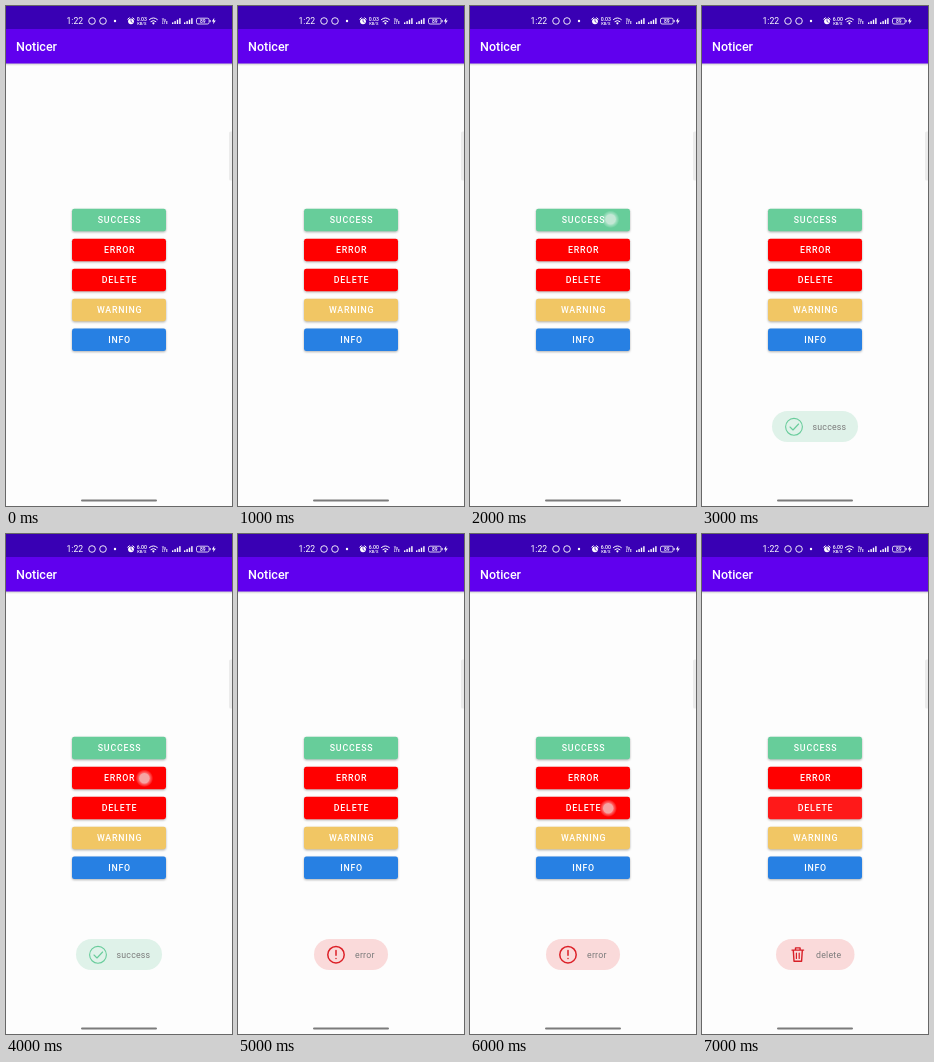
An HTML page for the animation above (8000 ms loop, 226 by 500 pixels).

```html
<!DOCTYPE html>
<html lang="en">
<head>
<meta charset="utf-8">
<title>Noticer</title>
<style>
  html, body { margin: 0; width: 100%; height: 100%; overflow: hidden; background: #fdfdfd; }
  svg { display: block; width: 100vw; height: 100vh; }
  text { font-family: Roboto, sans-serif; fill: #fff; }
  .title { font-size: 12.5px; font-weight: 500; }
  .label { font-size: 8.8px; font-weight: 500; letter-spacing: .78px; text-anchor: middle; }
  .note { font-size: 8.8px; letter-spacing: .22px; fill: #7c7c7c; }
  .tiny { font-weight: 500; text-anchor: middle; }
  .line { fill: none; stroke-linecap: round; stroke-linejoin: round; }
</style>
</head>
<body>
<svg viewBox="0 0 226 500" xmlns="http://www.w3.org/2000/svg">
  <defs>
    <filter id="soft" x="-20%" y="-40%" width="140%" height="180%"><feGaussianBlur stdDeviation=".8"/></filter>
    <linearGradient id="drop" x2="0" y2="1">
      <stop stop-color="#000" stop-opacity=".22"/>
      <stop offset="1" stop-color="#000" stop-opacity="0"/>
    </linearGradient>
    <radialGradient id="glow">
      <stop offset=".62" stop-color="#fff" stop-opacity=".42"/>
      <stop offset="1" stop-color="#fff" stop-opacity="0"/>
    </radialGradient>
  </defs>

  <rect width="226" height="500" fill="#fdfdfd"/>
  <rect y="57" width="226" height="3" fill="url(#drop)"/>
  <rect width="226" height="57.5" fill="#6000ee"/>
  <rect width="226" height="23" fill="#3900b4"/>
  <text class="title" x="10" y="45.3">Noticer</text>

  <g id="status" fill="#fff">
    <text x="60.5" y="18" font-size="8.6">1:22</text>
    <g fill="none" stroke="#fff" stroke-width=".9">
      <circle cx="86" cy="15" r="3.3"/>
      <circle cx="97" cy="15" r="3.3"/>
    </g>
    <circle cx="109" cy="15" r="1.2"/>
    <circle cx="125" cy="15.3" r="2.9"/>
    <path class="line" stroke="#fff" d="M121.8 13.1l1.5-1.3M128.2 13.1l-1.5-1.3"/>
    <path class="line" stroke="#3900b4" stroke-width=".7" d="M125 13.7v1.8l1.2.7"/>
    <text id="rate" class="tiny" x="135.8" y="14.8" font-size="5.2"></text>
    <text class="tiny" x="135.8" y="18.8" font-size="4">KB/S</text>
    <g class="line" stroke="#fff" stroke-width="1">
      <path d="M143.4 13.6q4-3.5 8 0M144.9 15.5q2.5-2 5 0"/>
    </g>
    <circle cx="147.4" cy="17.3" r="1.1"/>
    <text class="tiny" x="158" y="14.6" font-size="3.8">Vo</text>
    <text class="tiny" x="158.8" y="18.4" font-size="3.8">LTE</text>
    <g id="bars"></g>
    <rect x="190.5" y="12.2" width="12.6" height="5.8" rx="1.6" fill="none" stroke="#fff" stroke-width=".8"/>
    <rect x="203.7" y="14" width=".9" height="2.2"/>
    <text class="tiny" x="196.8" y="17" font-size="5">89</text>
    <path d="M208.3 11.8l-2.5 3.7h1.7l-.4 2.8 2.7-3.9h-1.8z"/>
  </g>

  <g id="buttons"></g>
  <rect x="223" y="125.5" width="5" height="49" rx="1.5" fill="#ececec"/>
  <rect x="75" y="493.4" width="76" height="2" rx="1" fill="#7b7b7b"/>

  <g id="success">
    <rect x="70" y="405" width="86" height="31" rx="15.5" fill="#dff2e9"/>
    <g class="line" stroke="#68cc9b" stroke-width="1.1">
      <circle cx="92" cy="420.8" r="8.4"/>
      <path d="M88 421l3 3 5.6-6"/>
    </g>
    <text class="note" x="110.5" y="424">success</text>
  </g>
  <g id="error">
    <rect x="76" y="405" width="74" height="31" rx="15.5" fill="#fadada"/>
    <g class="line" stroke="#dc2027" stroke-width="1.5">
      <circle cx="98" cy="420.7" r="8.2"/>
      <path d="M98 416.5v4.8M98 424.5v.1"/>
    </g>
    <text class="note" x="117" y="424">error</text>
  </g>
  <g id="delete">
    <rect x="74" y="405" width="78.5" height="31" rx="15.5" fill="#fadada"/>
    <g class="line" stroke="#d81f27" stroke-width="1.4">
      <path d="M90 416.1h11.6M93.5 416v-2.1h4.6v2.1M91.3 416.3l.7 10.9h7.6l.7-10.9"/>
      <path stroke-width="1.2" d="M94.4 419v5.4M97.2 419v5.4"/>
    </g>
    <text class="note" x="114" y="424">delete</text>
  </g>

  <g id="touch">
    <circle r="8.8" fill="url(#glow)"/>
    <circle r="5.2" fill="#e9eeec" fill-opacity=".45"/>
  </g>
</svg>
<script>
  const LOOP = 8000;
  const byId = id => document.getElementById(id);
  const show = (id, on) => byId(id).setAttribute('visibility', on ? 'visible' : 'hidden');

  const buttons = [
    ['SUCCESS', '#67cd9a'],
    ['ERROR', '#ff0000'],
    ['DELETE', '#ff0000'],
    ['WARNING', '#f1c664'],
    ['INFO', '#2780e3']
  ];
  byId('buttons').innerHTML = buttons.map(([label, color], i) => {
    const y = 202.8 + i * 29.95;
    const box = `x="66" width="94" height="22.5" rx="2.4"`;
    return `<rect ${box} y="${y + 1}" fill="#000" fill-opacity=".3" filter="url(#soft)"/>
      <rect id="${label}" ${box} y="${y}" fill="${color}"/>
      <text class="label" x="113.6" y="${y + 14.6}">${label}</text>`;
  }).join('');

  const signal = x => [1.6, 2.9, 4.3, 5.8].map((h, i) =>
    `<rect x="${x + i * 2.4}" y="${18 - h}" width="1.4" height="${h}"/>`).join('');
  byId('bars').innerHTML = signal(166) + signal(178);

  // Each press lasts from its start until the matching toast appears.
  const presses = [
    { at: 2000, x: 140.6, y: 213.3, toast: 'success' },
    { at: 4000, x: 138.4, y: 244.3, toast: 'error' },
    { at: 6000, x: 138.2, y: 274.2, toast: 'delete' }
  ];
  const HOLD = 1000;

  function draw(t) {
    const press = presses.find(p => t >= p.at && t < p.at + HOLD);
    const last = presses.filter(p => t >= p.at + HOLD).pop();
    for (const p of presses) show(p.toast, p === last);
    show('touch', press);
    if (press) byId('touch').setAttribute('transform', `translate(${press.x} ${press.y})`);
    byId('rate').textContent = t < 3000 ? '0.03' : '6.00';
    byId('DELETE').setAttribute('fill', t >= 7000 ? '#ff1919' : '#ff0000');
  }

  const start = performance.now();
  function tick() {
    draw((performance.now() - start) % LOOP);
    requestAnimationFrame(tick);
  }
  tick();
</script>
</body>
</html>
```
